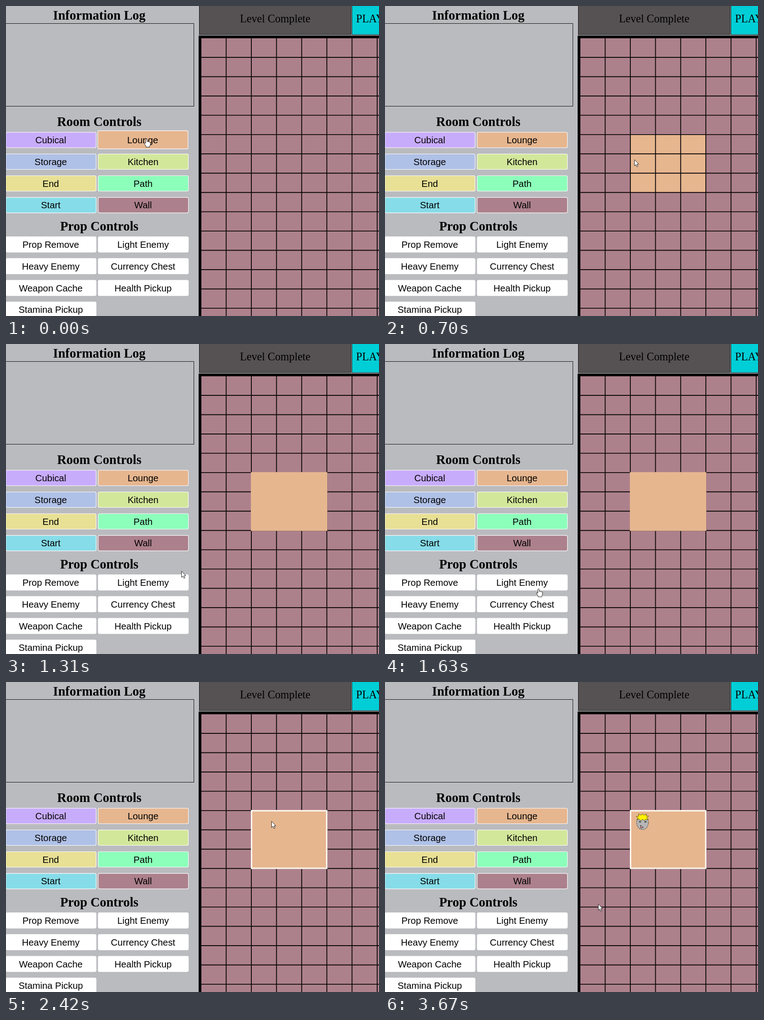
Write an HTML page that moves like this. It is 821 px wide and 682 px high and loops after 4.82 s.

```html
<!DOCTYPE html>
<html lang="en">
<head>
<meta charset="utf-8">
<title>Level editor</title>
<style>
  html, body { margin: 0; width: 100%; height: 100%; overflow: hidden; background: #babbbf; }
  svg { display: block; width: 821px; height: 682px; }
  text { text-anchor: middle; }
  .head { font: bold 28.5px "Liberation Serif", "Times New Roman", serif; }
  .bar { font: 24.2px "Liberation Serif", "Times New Roman", serif; }
  .btn { font: 20.4px "Liberation Sans", Arial, sans-serif; }
</style>
</head>
<body>
<svg id="stage" viewBox="0 0 821 682"></svg>
<script>
const LOOP = 4820;
const COLS = 8, ROWS = 15;
const BEIGE = '#e6b68f';
const stage = document.getElementById('stage');

function add(tag, attrs, parent = stage, label) {
  const el = document.createElementNS('http://www.w3.org/2000/svg', tag);
  for (const k in attrs) el.setAttribute(k, attrs[k]);
  if (label) el.textContent = label;
  parent.appendChild(el);
  return el;
}
const rect = (x, y, width, height, fill, parent, more) =>
  add('rect', { x, y, width, height, fill, ...more }, parent);
const label = (cls, x, y, str, parent) => add('text', { class: cls, x, y }, parent, str);
const show = (el, on) => el.setAttribute('visibility', on ? 'visible' : 'hidden');

const gx = c => 429.2 + 55.4 * c;
const gy = r => 70.6 + 42.45 * r;

// Left panel
rect(0, 0, 821, 682, '#babbbf');
rect(-1.5, 38.5, 415, 182, 'none', stage, { stroke: '#111' });
label('head', 205.3, 30, 'Information Log');
label('head', 205.3, 264, 'Room Controls');
label('head', 205.3, 494, 'Prop Controls');

function button(name, i, top, fill) {
  const x = i % 2 ? 203 : -0.2;
  const y = top + Math.floor(i / 2) * 47.8;
  const g = add('g', {});
  const box = rect(x, y, 198.5, 34, fill, g, { rx: 3, stroke: '#fff', 'stroke-width': 1.1 });
  const text = label('btn', x + 98.7, y + 24.3, name, g);
  return on => {
    box.setAttribute('x', x - (on ? 0.8 : 0));
    box.setAttribute('y', y - (on ? 3.3 : 0));
    box.setAttribute('height', on ? 40 : 34);
    text.setAttribute('x', x + (on ? 97.8 : 98.7));
  };
}
const rooms = [
  ['Cubical', '#c8acfc'], ['Lounge', BEIGE], ['Storage', '#b0c1e7'], ['Kitchen', '#d3e79b'],
  ['End', '#e8e094'], ['Path', '#8cffba'], ['Start', '#86dce8'], ['Wall', '#ac808c']
].map(([name, fill], i) => button(name, i, 277.7, fill));
const props = ['Prop Remove', 'Light Enemy', 'Heavy Enemy', 'Currency Chest',
  'Weapon Cache', 'Health Pickup', 'Stamina Pickup'
].map((name, i) => button(name, i, 507.6, '#fff'));

// Top bar
rect(425.5, -1, 334, 64, '#565152', stage, { stroke: '#111' });
label('bar', 592.5, 36, 'Level Complete');
rect(761.5, -1, 80, 64, '#00ced6', stage, { stroke: '#111' });
label('bar', 770.5, 36, 'PLAY').style.textAnchor = 'start';

// Level grid
rect(424, 65, 400, 620, '#000');
rect(430, 71, 400, 620, '#ad818c');
const ghost = rect(0, 0, 55.4 * 3, 42.45 * 3, BEIGE);
let lines = '';
for (let c = 1; c < COLS; c++) lines += `M${gx(c)} 70V690`;
for (let r = 1; r < ROWS; r++) lines += `M429 ${gy(r)}H830`;
add('path', { d: lines, stroke: '#0c0809', 'stroke-width': 1.9, fill: 'none' });

// Placed room: columns 2-4, rows 5-7
const room = add('g', {});
const tiles = [];
for (let c = 2; c < 5; c++) for (let r = 5; r < 8; r++) {
  const el = rect(gx(c) - 1, gy(r) - 1, 57.4, 44.4, BEIGE, room);
  tiles.push({ c, r, el });
}
const seam = add('path', { stroke: '#bd946f', 'stroke-width': 1, fill: 'none' }, room);
const outline = rect(gx(2) + 0.5, gy(5) + 0.4, 165.4, 126.6, 'none', stage,
  { stroke: '#fffaf3', 'stroke-width': 3 });

// Enemy sprite
const enemy = add('g', { transform: 'translate(566.8 308)' });
add('ellipse', { cx: 0, cy: 1.5, rx: 13, ry: 15.2, fill: '#b5b5b5', stroke: '#5d5550',
  'stroke-width': 1.2, 'stroke-dasharray': '3 1.5' }, enemy);
add('path', { d: 'M-13 -5L-9 -8L-14 -12L-8 -13L-9 -18L-3 -15L0 -18.5L3 -15L9 -18L8 -13L13.5 -13L9.5 -9L13 -5L7 -6L4 -3L0 -6L-4 -3L-7 -6Z',
  fill: '#fff200', stroke: '#54480c', 'stroke-width': 0.9 }, enemy);
add('path', { d: 'M-8 -0.5H-3M-5.5 -2.5V1.5M4 -0.5H9M6.5 -2.5V1.5', stroke: '#2c3a38',
  'stroke-width': 1.3 }, enemy);
add('path', { d: 'M-4.5 7L2 12L-4 13.5Z', fill: '#e79aa8', stroke: '#3d2d30',
  'stroke-width': 1 }, enemy);

// Pointers, both with the tip at 0,0
const arrow = add('path', { d: 'M0.5 0.5V14.2L3.6 11.4L5.7 16.3L8 15.3L5.9 10.6H10Z',
  fill: '#fff', stroke: '#222', 'stroke-width': 1 });
const hand = add('path', { d: 'M-1.5 10V1.4Q0 -0.8 1.5 1.4V6.2Q3.2 5.2 4.2 6.8Q6 5.8 6.7 7.4Q8.6 6.8 8.7 9V13Q8.6 15 7 16.2V18.3H-1V16.3L-4.4 11Q-4.8 8.8 -2.8 9.2Z',
  fill: '#fff', stroke: '#222', 'stroke-width': 1, 'stroke-linejoin': 'round' });

// Moments at which the screen refreshes
const ticks = [0, 310, 390, 450, 520, 610, 700, 790,
  1040, 1100, 1190, 1250, 1310, 1370, 1460, 1550,
  1630, 1690, 1760, 1830, 1900, 1970, 2050, 2120,
  2180, 2240, 2300, 2360, 2420,
  2640, 2710, 2780, 2860, 2930, 3550, 3670];

const linear = u => u;
const out = u => 1 - (1 - u) ** 2;
const smooth = u => u * u * (3 - 2 * u);

// time, x, y, easing towards the point
const path = [
  [0, 309, 292], [260, 309, 292], [520, 458, 277, linear], [790, 560, 345, out],
  [980, 560, 345], [1100, 504, 389, linear], [1550, 339, 543, out],
  [1630, 338, 538, linear], [1640, 338, 538], [2120, 539, 334, smooth],
  [2130, 539, 334], [2420, 584, 306, out], [2600, 584, 306],
  [2930, 470, 487, smooth], [3540, 470, 487], [3550, 469.5, 488], [3670, 469, 488]
];

function pointer(t) {
  const i = path.findIndex(p => p[0] > t);
  if (i < 0) return path[path.length - 1].slice(1, 3);
  const a = path[i - 1], b = path[i];
  const u = (b[3] || linear)((t - a[0]) / (b[0] - a[0]));
  return [1, 2].map(k => a[k] + (b[k] - a[k]) * u);
}

// Column and row of the pointer's cell while a room is being placed
function target(t) {
  if (t >= 700 && t < 1040) return [2, 6];
  if (t >= 1100 && t < 1190) return [1, 7];
  if (t >= 1190 && t < 1250) return [0, 8];
  return null;
}

function draw(time) {
  const t = ticks.filter(k => k <= time).pop();
  const [x, y] = pointer(t);
  const over = x < 402 && (y < 316 || y > 503);
  show(hand, over);
  show(arrow, !over);
  (over ? hand : arrow).setAttribute('transform', `translate(${x} ${y})`);

  rooms[1](t < 610);
  props[1]((t >= 1460 && t < 1630) || (t >= 1690 && t < 1830));

  const cell = target(t);
  const inGhost = (c, r) => cell && c >= cell[0] && c < cell[0] + 3 && Math.abs(r - cell[1]) < 2;
  show(ghost, cell);
  if (cell) {
    ghost.setAttribute('x', gx(cell[0]));
    ghost.setAttribute('y', gy(cell[1] - 1));
  }

  const placed = t >= 1040;
  let edge = '';
  for (const { c, r, el } of tiles) {
    const solid = placed && !inGhost(c, r);
    show(el, solid);
    if (solid && c > 2 && inGhost(c - 1, r)) edge += `M${gx(c) - 0.7} ${gy(r)}V${gy(r + 1)}`;
  }
  seam.setAttribute('d', edge);
  show(outline, t >= 2240);
  show(enemy, t >= 2640);
}

const start = performance.now();
function frame() {
  draw((performance.now() - start) % LOOP);
  requestAnimationFrame(frame);
}
frame();
</script>
</body>
</html>
```
